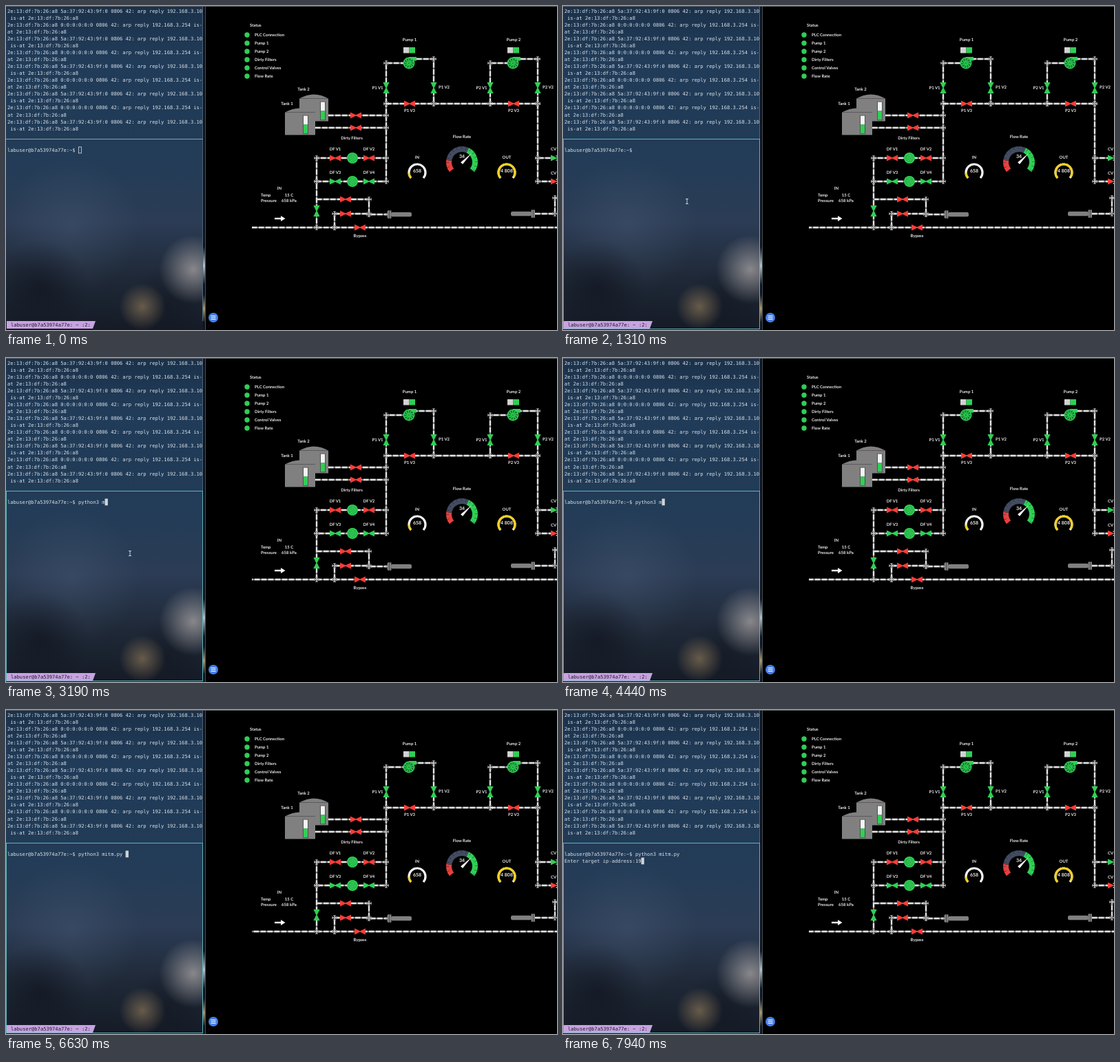
Write an HTML page with a canvas that moves like this. It is 800 px wide and 471 px high and loops after 8 s.

```html
<!DOCTYPE html>
<html>
<head>
<meta charset="utf-8">
<title>Plant monitor</title>
<style>
html, body { margin: 0; width: 100%; height: 100%; overflow: hidden; background: #000; }
canvas { display: block; width: 800px; height: 471px; }
</style>
</head>
<body>
<canvas id="stage"></canvas>
<script>
const W = 800, H = 471, LOOP = 8000;
const GREEN = '#2fcf55', RED = '#f63c38', GREY = '#808080', YELLOW = '#f2cf22', TEAL = '#62b4bb';
const canvas = document.getElementById('stage');
const dpr = window.devicePixelRatio || 1;
canvas.width = W * dpr;
canvas.height = H * dpr;
const g = canvas.getContext('2d');
let now = 0;

// ---- helpers ----
function rect(x, y, w, h, color) {
  g.fillStyle = color;
  g.fillRect(x, y, w, h);
}
function frame(x, y, w, h, color, width = 1) {
  g.strokeStyle = color;
  g.lineWidth = width;
  g.strokeRect(x, y, w, h);
}
function disc(x, y, r, color) {
  g.fillStyle = color;
  g.beginPath();
  g.arc(x, y, r, 0, Math.PI * 2);
  g.fill();
}
function poly(color, ...points) {
  g.fillStyle = color;
  g.beginPath();
  points.forEach(([x, y]) => g.lineTo(x, y));
  g.closePath();
  g.fill();
}
function line(points, color, width) {
  g.strokeStyle = color;
  g.lineWidth = width;
  g.beginPath();
  points.forEach(([x, y]) => g.lineTo(x, y));
  g.stroke();
}
function arc(x, y, r, from, to, color, width) {
  g.strokeStyle = color;
  g.lineWidth = width;
  g.beginPath();
  g.arc(x, y, r, from * Math.PI / 180, to * Math.PI / 180);
  g.stroke();
}
function at(x, y, angle, paint) {
  g.save();
  g.translate(x, y);
  g.rotate(angle);
  paint();
  g.restore();
}
function label(text, x, y, align = 'center', size = 6) {
  g.font = `bold ${size}px Lato, sans-serif`;
  g.textAlign = align;
  g.fillStyle = '#ececec';
  g.fillText(text, x, y + size * 0.36);
}
const CHAR = 4.29, ROW = 10.07;
function mono(text, x, y, color = '#dce2e8') {
  g.font = '7.13px "DejaVu Sans Mono", monospace';
  g.textAlign = 'left';
  g.fillStyle = color;
  g.fillText(text, x, y + 2.5);
}

// ---- terminal ----
function fade(y0, y1, colors) {
  const fill = g.createLinearGradient(0, y0, 0, y1);
  colors.forEach((color, i) => fill.addColorStop(i / (colors.length - 1), color));
  return fill;
}
function glow(x, y, r, rgb, alpha) {
  const fill = g.createRadialGradient(x, y, 0, x, y, r);
  fill.addColorStop(0, `rgba(${rgb},${alpha})`);
  fill.addColorStop(0.5, `rgba(${rgb},${alpha / 2})`);
  fill.addColorStop(1, `rgba(${rgb},0)`);
  rect(0, 195, 286, 275, fill);
}
function backdrop() {
  rect(0, 0, 286, H, fade(0, H, ['#1b314a', '#213c59', '#203b57', '#243c57', '#2c3c55', '#1f2938', '#151b26']));
  glow(95, 320, 100, '84,102,130', 0.3);
  glow(50, 410, 70, '16,21,30', 0.65);
  glow(235, 435, 60, '16,21,30', 0.4);
  glow(272, 383, 50, '170,166,166', 0.75);
  glow(198, 437, 34, '156,130,96', 0.6);
  rect(286, 0, 3, H, '#0b1420');
  rect(286, 350, 3, 55, fade(350, 405, ['#0b1420', '#b2bec8', '#0b1420']));
  rect(286, 420, 3, 40, fade(420, 460, ['#0b1420', '#a89568', '#0b1420']));
}
function arpLog() {
  const mac = '2e:13:df:7b:26:a8';
  for (let i = 0; i < 9; i++) {
    const [to, ip] = i % 2 ? ['0:0:0:0:0:0', '192.168.3.254'] : ['5a:37:92:43:9f:0', '192.168.3.10'];
    const reply = `${mac} ${to} 0806 42: arp reply ${ip} is-at ${mac}`;
    mono(reply.slice(0, 66), 2, 7 + i * 2 * ROW);
    mono(reply.slice(66), 2, 7 + (i * 2 + 1) * ROW);
  }
}
function statusBar() {
  poly('#c9a2e2', [1, 458], [130, 458], [126, 469], [1, 469]);
  mono('labuser@b7a53974a77e: ~ :2:', 7, 463.5, '#1d1b28');
}

const FOCUS = 620, TYPE = 1800, STEP = 140, COMPLETE = 5120, ENTER = 6900, ANSWER = 7540;
const SHELL = 'labuser@b7a53974a77e:~$ ', COMMAND = 'python3 mitm.py ', STEM = 'python3 m';

function typed(text, start, step) {
  return text.slice(0, Math.max(0, Math.floor((now - start) / step) + 1));
}
function session() {
  const focused = now >= FOCUS;
  rect(285, 0, 1, 458, '#50687a');
  rect(0, 193, 286, 1, '#8aa3ad');
  if (focused) frame(0.5, 193.5, 285, 276, TEAL);

  const rows = [SHELL + (now < COMPLETE ? typed(STEM, TYPE, STEP) : COMMAND)];
  if (now >= ENTER) rows.push('Enter target ip-address:' + typed('19', ANSWER, 180));
  rows.forEach((text, i) => mono(text, 2, 209.5 + i * ROW));

  const x = 2 + rows.at(-1).length * CHAR, y = 204.5 + (rows.length - 1) * ROW;
  if (!focused) frame(x + 0.4, y + 0.4, 4, 9, '#dce2e8', 0.8);
  else if (now >= TYPE) rect(x, y, CHAR, 9.8, '#d0d4d8');

  if (focused && now < 4250) {
    rect(179.6, 280.5, 0.9, 7, '#d9dee3');
    rect(178, 280, 4, 0.9, '#d9dee3');
    rect(178, 287, 4, 0.9, '#d9dee3');
  }
}

// ---- plant parts ----
function joint(x, y) {
  for (let i = 0; i < 4; i++) {
    at(x, y, i * Math.PI / 2, () => poly('#a6a6a6', [0, 0], [3.8, -2], [3.8, 2]));
  }
}
// A route alternates horizontal and vertical moves: x, y, next x, next y, ...
function route(speed, x, y, ...moves) {
  const points = [[x, y]];
  moves.forEach((to, i) => {
    if (i % 2) y = to; else x = to;
    points.push([x, y]);
  });
  line(points, '#747474', 2.3);
  g.setLineDash([7.5, 2.5]);
  g.lineDashOffset = -now * speed;
  line(points, '#e4e4e4', 2.3);
  g.setLineDash([]);
  points.slice(1).forEach(p => joint(...p));
}
const flow = (...path) => route(0.02, ...path);
const idle = (...path) => route(0, ...path);

function valve(x, y, color, angle = 0) {
  at(x, y, angle, () => {
    rect(-8, -2, 16, 4, '#000');
    for (const side of [-8, 8]) poly(color, [side, -4.6], [0, -0.7], [0, 0.7], [side, 4.6]);
  });
}
const upright = (x, y) => valve(x, y, GREEN, Math.PI / 2);

function pump(x, y) {
  rect(x, y - 9, 11, 5.5, GREEN);
  disc(x, y, 8.5, GREEN);
  disc(x, y, 7, '#17742f');
  for (let i = 0; i < 10; i++) {
    at(x, y, now / LOOP * Math.PI * 12 + i * Math.PI / 5, () => line([[1, 0], [4, 0.6], [6.8, 2.4]], GREEN, 1.3));
  }
}
function filter(x, y) {
  disc(x, y, 8, GREEN);
  arc(x, y, 5.6, 0, 360, '#1d8a3c', 0.6);
  for (let i = -2; i <= 2; i += 2) {
    line([-5, -2, 1, 4].map((dx, k) => [x + dx, y + i * 1.3 + (k % 2 ? -1 : 1)]), '#1d8a3c', 0.6);
  }
}
function tank(x, y, w, barX) {
  g.fillStyle = GREY;
  g.beginPath();
  g.moveTo(x, y + 33);
  g.lineTo(x, y);
  g.quadraticCurveTo(x + w / 2, y - 12, x + w, y);
  g.lineTo(x + w, y + 33);
  g.fill();
  line([[x, y], [x + w, y]], '#4a4a4a', 0.7);
  rect(barX - 0.6, y + 4.4, 7.2, 27.2, '#333');
  rect(barX, y + 5, 6, 13, '#f4f4f4');
  rect(barX, y + 18, 6, 13, GREEN);
}
function launcher(x, y, angle) {
  at(x, y, angle, () => {
    rect(0, -5.7, 5.5, 11.4, GREY);
    rect(2.2, -5.7, 0.8, 11.4, '#444');
    g.fillStyle = GREY;
    g.beginPath();
    g.roundRect(5, -3.3, 30, 6.6, 2.5);
    g.fill();
  });
}
function flowGauge(x, y) {
  label('Flow Rate', x, y - 37);
  arc(x, y, 19, 142, 188, '#e8403c', 8);
  arc(x, y, 19, 188, 296, '#434b62', 8);
  arc(x, y, 19, 296, 398, GREEN, 8);
  for (let a = 160; a < 398; a += 18) {
    at(x, y, a * Math.PI / 180, () => rect(19, -0.3, 4, 0.6, 'rgba(10,25,20,0.6)'));
  }
  poly('#fff', [x - 1.8, y + 0.3], [x + 14, y - 13], [x + 1, y + 3]);
  label('34', x, y - 8.5, 'center', 7);
}
function pressureGauge(x, name, value, yellowEnd) {
  label(name, x, 220);
  arc(x, 242, 12, 138, 402, '#f4f4f4', 3.2);
  arc(x, 242, 12, 138, yellowEnd, YELLOW, 3.2);
  label(value, x, 239.5, 'center', 7);
}

// ---- plant sections ----
function status() {
  label('Status', 354, 28, 'left');
  ['PLC Connection', 'Pump 1', 'Pump 2', 'Dirty Filters', 'Control Valves', 'Flow Rate'].forEach((text, i) => {
    disc(350, 42 + i * 12, 3.7, GREEN);
    label(text, 361, 41.5 + i * 12, 'left');
  });
}
function pumpLoop(n) {
  const x = 401 + n * 151, mid = x + 34, right = x + 69;
  flow(x, 142, x, 83, mid);
  flow(mid, 77, right, 142);
  idle(x, 142, right);
  upright(x, 119);
  upright(right, 119);
  valve(mid, 142, RED);
  pump(mid - 1, 83);
  rect(mid - 9, 60, 8.5, 8.5, '#d2d2d2');
  rect(mid - 0.5, 60, 8.5, 8.5, GREEN);
  label('Pump ' + n, mid, 49);
  label(`P${n} V1`, x - 20.5, 118.5, 'left');
  label(`P${n} V2`, right + 7, 118, 'left');
  label(`P${n} V3`, mid, 152);
}
function tanks() {
  idle(468, 159, 552);
  idle(449, 177, 552);
  valve(508, 159, RED);
  valve(508, 177, RED);
  tank(426, 134.5, 42, 457);
  tank(405, 154.5, 44, 432);
  label('Tank 2', 432, 121);
  label('Tank 1', 408, 142);
}
function filters() {
  label('Dirty Filters', 502, 191.5);
  idle(451, 255, 451, 221, 552);
  [RED, GREEN].forEach((color, row) => {
    const y = 221 + row * 34;
    for (const side of [0, 1]) {
      valve(478 + side * 49, y, color);
      label(`DF V${row * 2 + side + 1}`, 478 + side * 49, y - 13);
    }
    filter(503, y);
  });
}
function inlet() {
  flow(357, 322, 451, 255, 552, 142);
  upright(451, 298);
  label('IN', 397, 265);
  label('Temp', 370, 275, 'left');
  label('15 C', 411, 275);
  label('Pressure', 370, 283, 'left');
  label('658 kPa', 411, 283);
  rect(390, 307.8, 9, 2.4, '#fff');
  poly('#fff', [399, 305], [405.5, 309], [399, 313]);
}
function bypass() {
  idle(451, 322, 477);
  idle(477, 322, W + 10);
  idle(451, 281, 527, 303, 555);
  idle(477, 322, 477, 302, 527);
  idle(768, 302, 797, 279, W + 10);
  valve(493, 281, RED);
  valve(493, 302, RED);
  valve(514, 322, RED);
  launcher(554, 303, 0);
  launcher(768, 302, Math.PI);
  label('Bypass', 514, 334);
}
function outlet() {
  flow(621, 142, 703);
  flow(772, 142, 772, 221, W);
  idle(772, 221, 772, 255, W);
  [GREEN, RED].forEach((color, row) => {
    valve(799, 221 + row * 34, color);
    label('CV', 791, 208 + row * 35, 'left');
  });
}
function menu() {
  disc(301, 453, 7, '#4680e8');
  for (let i = -1; i <= 1; i++) rect(297.5, 452.5 + i * 2.4, 7, 1, '#fff');
}

function draw() {
  g.setTransform(dpr, 0, 0, dpr, 0, 0);
  g.textRendering = 'geometricPrecision';
  rect(0, 0, W, H, '#000');
  backdrop();
  arpLog();
  statusBar();
  session();

  bypass();
  inlet();
  filters();
  tanks();
  outlet();
  pumpLoop(1);
  pumpLoop(2);
  status();
  flowGauge(662, 227);
  pressureGauge(597, 'IN', '658', 178);
  pressureGauge(727, 'OUT', '4 808', 392);
  menu();
  rect(289, 0, 1, H, '#4c4f52');
  rect(0, 0, W, 1, '#5a5d60');
}
function tick() {
  now = performance.now() % LOOP;
  draw();
  requestAnimationFrame(tick);
}
tick();
</script>
</body>
</html>
```
